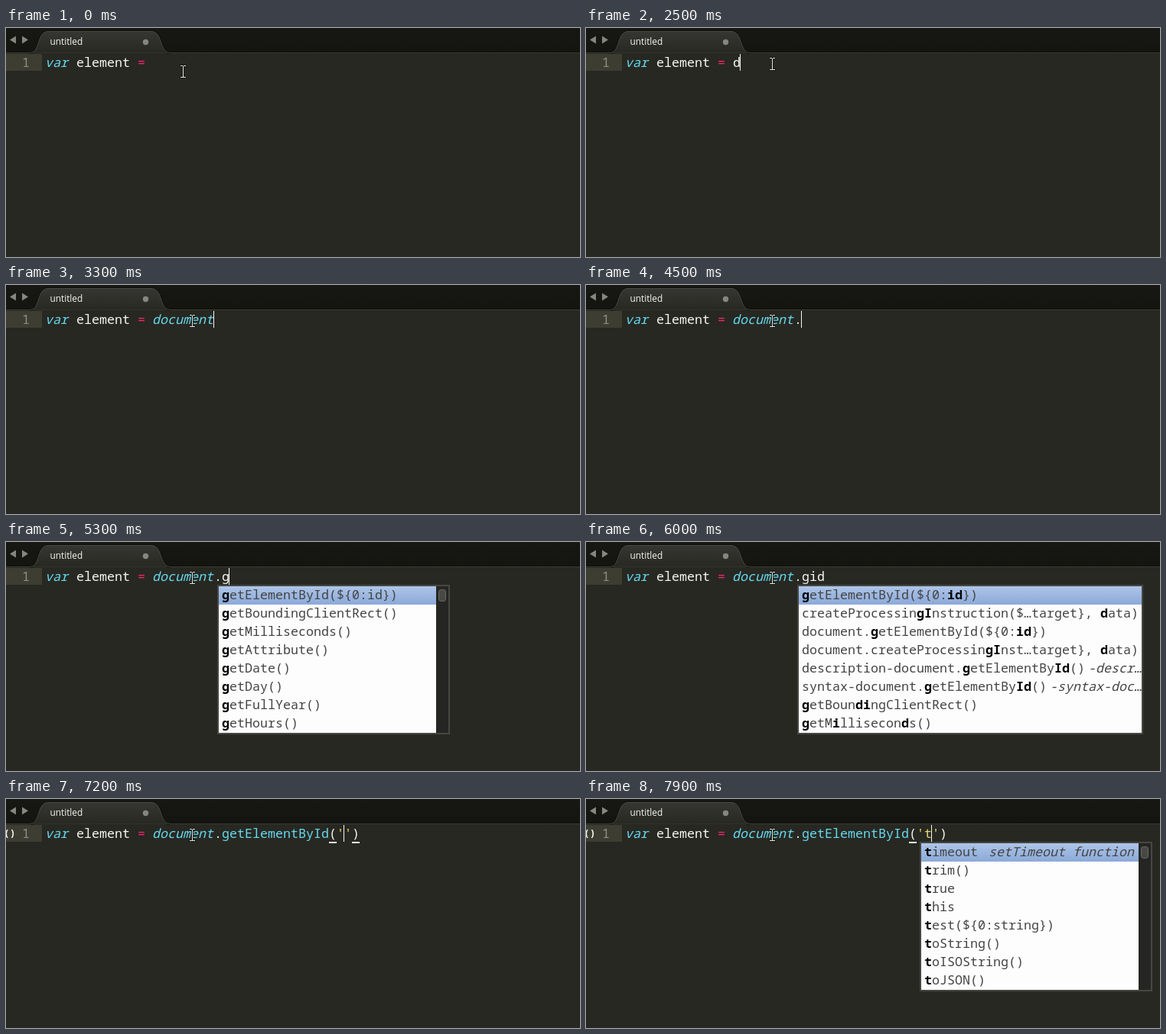
Animation, 750 px wide and 300 px high, one loop 8000 ms. Source, as an HTML page with a canvas:

```html
<!DOCTYPE html>
<html lang="en">
<head>
<meta charset="utf-8">
<title>Editor completion</title>
<style>
html, body { margin: 0; width: 100%; height: 100%; overflow: hidden; background: #272822; }
canvas { display: block; }
</style>
</head>
<body>
<canvas id="stage" width="750" height="300"></canvas>
<script>
const ctx = document.getElementById('stage').getContext('2d');
const LOOP = 8000;
const CELL = 10;
const ROW = 24;
const MONO = '16.667px "Noto Sans Mono", "DejaVu Sans Mono", monospace';
const WHITE = '#f8f8f2', CYAN = '#66d9ef', PINK = '#f92672', YELLOW = '#e6db74';

// *bold* marks the matched letters, | starts the hint
const docRows = match => ['', '.URL', '.anchors', '.applets', '.body', '.domain', '.embeds', '.forms']
  .map(end => `*${match}*${'document'.slice(match.length)}${end}`);
const getRows = ['ElementById(${0:id})', 'BoundingClientRect()', 'Milliseconds()', 'Attribute()',
  'Date()', 'Day()', 'FullYear()', 'Hours()'].map(end => `*g*et${end}`);
const gidRows = [
  '*g*etElementById(${0:*id*})',
  'createProcessin*gI*nstruction($…target}, *d*ata)',
  'document.*g*etElementById(${0:*id*})',
  'document.createProcessin*gI*nst…target}, *d*ata)',
  'description-document.*g*etElementBy*Id*()|-descr…',
  'syntax-document.*g*etElementBy*Id*()|-syntax-doc…',
  '*g*etBoun*di*ngClientRect()',
  '*g*etM*i*llisecon*d*s()'
];
const tRows = ['imeout| setTimeout function', 'rim()', 'rue', 'his', 'est(${0:string})',
  'oString()', 'oISOString()', 'oJSON()'].map(end => `*t*${end}`);

const popup = (x, rows, width = 304, scroll = true) => ({ x, rows, width, scroll });
const gPopup = popup(276, getRows);
const gidPopup = popup(276, gidRows, 452, false);
const tPopup = popup(436, tRows);

const doc = ['document', CYAN, 'italic'];
const member = name => [doc, ['.' + name, WHITE]];
const call = (arg, color) => [doc, ['.', WHITE], ['getElementById', CYAN], ['(', WHITE], [arg, color], [')', WHITE]];

// time, tokens after "=", caret x, extras
const states = [
  [0, [], 191],
  [2500, [['d', WHITE]], 201],
  [2700, [['do', WHITE]], 211, { menu: popup(186, docRows('do')) }],
  [2800, [['doc', WHITE]], 221, { menu: popup(186, docRows('doc')) }],
  [3300, [doc], 271],
  [4500, member(''), 281],
  [5100, member('g'), 291],
  [5200, member('g'), 291, { menu: gPopup }],
  [5500, member('gi'), 301, { menu: gidPopup }],
  [5600, member('gid'), 311, { menu: gidPopup }],
  [6100, call('id', WHITE), 451, { selection: true }],
  [6800, call('', WHITE), 431, { brackets: [422, 432] }],
  [7000, call("''", YELLOW), 441, { brackets: [422, 432] }],
  [7200, call("''", YELLOW), 441, { brackets: [422, 452] }],
  [7700, call("'t'", YELLOW), 451, { brackets: [422, 462] }],
  [7800, call("'t'", YELLOW), 451, { brackets: [422, 462], menu: tPopup }]
];
const blinks = [[0, 0], [300, .4], [400, .8], [500, 1], [1000, .5], [1100, 0], [1800, .5], [1900, 1],
  [2300, 0], [2500, 1], [3800, .5], [3900, 0], [4500, 1], [4900, 0], [5100, 1], [6000, 0],
  [6100, 1], [6600, 0], [6800, 1]];
const pointer = [[0, 231, 57], [300, 235, 54], [400, 240, 49], [500, 243, 47]];

const at = (steps, t) => steps.findLast(step => step[0] <= t);

function rect(color, x, y, w, h) {
  ctx.fillStyle = color;
  ctx.fillRect(x, y, w, h);
}

function shade(y0, y1, top, bottom) {
  const g = ctx.createLinearGradient(0, y0, 0, y1);
  g.addColorStop(0, top);
  g.addColorStop(1, bottom);
  return g;
}

function write(text, x, y, color, style = '') {
  ctx.font = `${style} ${MONO}`;
  ctx.fillStyle = color;
  ctx.fillText(text, style === 'italic' ? x - 1 : x, y);
  return x + text.length * CELL;
}

function triangle(x, tip) {
  ctx.fillStyle = '#868780';
  ctx.beginPath();
  ctx.moveTo(x, 10.5);
  ctx.lineTo(tip, 15.5);
  ctx.lineTo(x, 20.5);
  ctx.fill();
}

function tabPath() {
  ctx.beginPath();
  ctx.moveTo(32, 32.5);
  ctx.bezierCurveTo(45, 31.5, 40, 4.5, 55, 4.5);
  ctx.lineTo(190, 4.5);
  ctx.bezierCurveTo(205, 4.5, 200, 31.5, 214, 32.5);
}

function drawTabs() {
  rect(shade(0, 32, '#171814', '#141510'), 0, 0, 750, 32);
  rect('#0f100c', 0, 31, 750, 1);
  rect('#3b3c36', 0, 32, 750, 1);
  triangle(13, 5);
  triangle(21, 29);
  tabPath();
  ctx.lineWidth = 3;
  ctx.strokeStyle = '#0f100c';
  ctx.stroke();
  ctx.fillStyle = shade(4, 33, '#363732', '#272822');
  ctx.fill();
  ctx.lineWidth = 1;
  ctx.strokeStyle = '#484943';
  ctx.stroke();
  ctx.font = '11.8px "Open Sans", "Noto Sans", sans-serif';
  ctx.fillStyle = '#f8f8f4';
  ctx.fillText('untitled', 57.5, 22);
  ctx.fillStyle = '#85867f';
  ctx.beginPath();
  ctx.arc(182.5, 18.5, 3.7, 0, 7);
  ctx.fill();
}

function drawLine(tokens, { selection, brackets }) {
  rect('#3e3d32', 0, 34, 47, 22);
  write('1', 21, 51, '#8f908a');
  if (selection) rect('#49483e', 432, 34, 20, 22);
  write('var', 52, 51, CYAN, 'italic');
  write('element', 92, 51, WHITE);
  write('=', 172, 51, PINK);
  let x = 192;
  for (const [text, color, style] of tokens) x = write(text, x, 51, color, style);
  if (!brackets) return;
  for (const bx of brackets) rect(WHITE, bx, 56, 10, 2);
  ctx.font = 'bold 13px "Noto Sans Mono", monospace';
  ctx.fillStyle = WHITE;
  ctx.fillText('()', -3, 49);
}

function drawMenu({ x, rows, width, scroll }) {
  const inner = width - (scroll ? 20 : 4);
  rect('#464742', x, 56, width, 196);
  rect('#fdfdfd', x + 2, 58, inner, 192);
  rect(shade(58, 82, '#aec5e8', '#8ba9d8'), x + 2, 58, inner, ROW);
  if (scroll) {
    rect('#252623', x + 2 + inner, 58, 16, 192);
    ctx.fillStyle = '#484945';
    ctx.strokeStyle = '#696a66';
    ctx.beginPath();
    ctx.roundRect(x + 289.5, 62.5, 9, 15, 3);
    ctx.fill();
    ctx.stroke();
  }
  rows.forEach((row, i) => {
    const [label, hint] = row.split('|');
    const y = 75 + i * ROW;
    let px = x + 6;
    label.split('*').forEach((part, k) => {
      px = k % 2 ? write(part, px, y, '#000', 'bold') : write(part, px, y, '#444');
    });
    if (hint) write(hint, px + 5, y, '#444', 'italic');
  });
}

function drawPointer(x, y) {
  const parts = [[x, y - 7, 1, 15], [x - 3, y - 8, 3, 1], [x + 1, y - 8, 3, 1], [x - 3, y + 7, 3, 1], [x + 1, y + 7, 3, 1]];
  for (const [a, b, w, h] of parts) rect('#1a1a17', a - 1, b - 1, w + 2, h + 2);
  for (const part of parts) rect('#e8e8e4', ...part);
}

function draw(t) {
  const [, tokens, caret, extras = {}] = at(states, t);
  rect('#272822', 0, 0, 750, 300);
  drawTabs();
  drawLine(tokens, extras);
  ctx.globalAlpha = at(blinks, t)[1];
  rect('#f8f8f0', caret, 34, 1, 22);
  ctx.globalAlpha = 1;
  if (extras.menu) drawMenu(extras.menu);
  const [, px, py] = at(pointer, t);
  drawPointer(px, py);
}

const start = performance.now();
function tick() {
  draw((performance.now() - start) % LOOP);
  requestAnimationFrame(tick);
}
tick();
</script>
</body>
</html>
```
